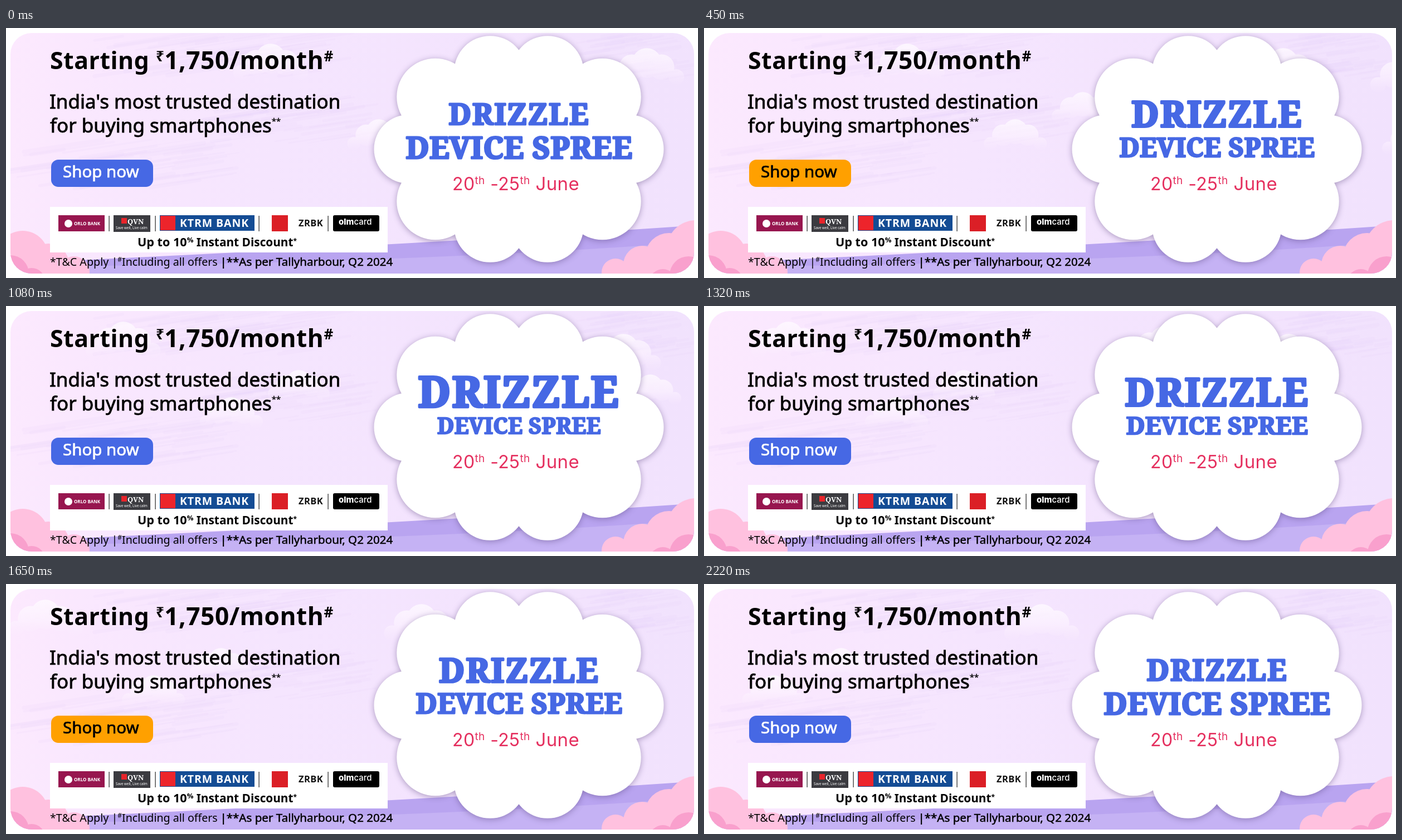
These frames come from a looping animation (1242 px wide and 450 px high, 2250 ms). An HTML page with a canvas:

```html
<!DOCTYPE html>
<html lang="en">
<head>
<meta charset="utf-8">
<title>Banner</title>
<style>
html, body { margin: 0; width: 100%; height: 100%; overflow: hidden; background: #fff; }
canvas { display: block; }
</style>
</head>
<body>
<canvas id="stage" width="1242" height="450"></canvas>
<script>
const W = 1242, H = 450, LOOP = 2250, STEP = 30;
const SANS = '"Noto Sans", "Open Sans", sans-serif';
const SERIF = '"Noto Serif", serif';
const INTER = 'Inter, sans-serif';
const BLUE = '#4668e4', ORANGE = '#ffa000', RED = '#e5305f';
const ctx = document.getElementById('stage').getContext('2d');

function layer(paint) {
  const c = document.createElement('canvas');
  c.width = W;
  c.height = H;
  paint(c.getContext('2d'));
  return c;
}

// Union of n circles, each given by a rule of its index
function blobs(n, rule) {
  const p = new Path2D();
  for (let i = 0; i < n; i++) {
    const [x, y, r] = rule(i);
    p.moveTo(x + r, y);
    p.arc(x, y, r, 0, 7);
  }
  return p;
}

function box(g, x, y, w, h, color, r = 0) {
  g.fillStyle = color;
  g.beginPath();
  g.roundRect(x, y, w, h, r);
  g.fill();
}

// Draws a run and returns its width; medium weight is regular plus a hairline
function text(g, str, x, y, size, weight = 400, color = '#000', font = SANS, gap = 0) {
  g.font = `${weight} ${size}px ${font}`;
  g.letterSpacing = gap + 'px';
  g.fillStyle = g.strokeStyle = color;
  g.fillText(str, x, y);
  if (weight === 500 && font === SANS) {
    g.lineWidth = size * 0.024;
    g.strokeText(str, x, y);
  }
  return g.measureText(str).width;
}

// Runs of [string, size, weight, rise] set one after another
function line(g, x, y, runs, color, font, gap) {
  for (const [str, size, weight, rise = 0] of runs)
    x += text(g, str, x, y - rise, size, weight, color, font, gap);
}

function clipCard(g) {
  g.beginPath();
  g.roundRect(8, 9, 1227, 433, 38);
  g.clip();
}

let seed = 11;
const rnd = () => (seed = seed * 16807 % 2147483647) / 2147483647;

// A loose patch of short dry brush strokes
function brush(g, x, y, w, h, color) {
  g.strokeStyle = color;
  g.lineCap = 'round';
  for (let i = 0; i < 45; i++) {
    const len = w * (0.1 + rnd() * 0.3);
    const sx = x + rnd() * (w - len), sy = y + rnd() * h;
    g.lineWidth = 1 + rnd() * 7;
    g.beginPath();
    g.moveTo(sx, sy);
    g.lineTo(sx + len, sy - len * 0.15);
    g.stroke();
  }
}

const sky = layer(g => {
  clipCard(g);
  const base = g.createLinearGradient(0, 0, W, 160);
  base.addColorStop(0, '#fce9fe');
  base.addColorStop(0.4, '#f5e5fe');
  base.addColorStop(1, '#f1e2fd');
  g.fillStyle = base;
  g.fillRect(0, 0, W, H);
  const shade = 'rgba(226,206,247,.14)';
  brush(g, 150, 20, 500, 70, shade);
  brush(g, 0, 220, 420, 70, shade);
  brush(g, 340, 130, 330, 80, shade);
  brush(g, 1020, 15, 230, 80, shade);
});

// Row of puffs stepping down sideways from a corner
function bank(g, x, y, r, dx, n, color) {
  g.fillStyle = color;
  g.fill(blobs(n, i => [x + i * dx, y + i * 14, r - i * 9]));
}

function hill(g, x, y, midY, endY, color) {
  g.fillStyle = color;
  g.beginPath();
  g.moveTo(x, H);
  g.lineTo(x, y);
  g.quadraticCurveTo(700, midY, W, endY);
  g.lineTo(W, H);
  g.fill();
}

// Ten lobes on an ellipse, pulled a little towards its diagonals
function lobe(i) {
  const a = i * Math.PI / 5, s = Math.sin(2 * a), b = a + 0.087 * s;
  return [920.5 + 198 * Math.cos(b), 218 + 144 * Math.sin(b), 62 + 8 * s * s];
}

function scenery(g) {
  g.save();
  clipCard(g);
  hill(g, 0, 424, 392, 355, '#b9a4f0');
  hill(g, 0, 430, 425, 385, '#c5b2f4');
  bank(g, 30, 411, 46, 46, 3, '#ffc1df');
  bank(g, 1238, 398, 52, -48, 4, '#ffc1df');
  bank(g, 8, 442, 33, 38, 2, '#f9a0cd');
  bank(g, 1225, 445, 34, -46, 2, '#f9a0cd');
  g.restore();

  g.save();
  g.shadowColor = 'rgba(85,65,120,.45)';
  g.shadowBlur = 11;
  g.shadowOffsetY = 2;
  g.fillStyle = '#fff';
  const cloud = blobs(10, lobe);
  cloud.addPath(blobs(1, () => [920, 218, 160]));
  g.fill(cloud);
  g.restore();
}

function copy(g) {
  line(g, 79, 74, [['Starting ', 42.8, 700], ['₹', 26, 700, 14], ['1,750/month', 44.3, 700], ['#', 26, 600, 14]],
    '#000', SANS, 0.5);
  line(g, 78, 145, [["India's most trusted destination", 35, 500]]);
  line(g, 79, 188, [['for buying smartphones', 35, 500], ['**', 15, 500, 15]]);
  line(g, 801, 292, [['20', 32, 400], ['th', 19, 400, 11], [' -25', 32, 400], ['th', 19, 400, 11], [' June', 33, 400]],
    RED, INTER, 0.4);
  line(g, 79, 428, [['*T&C Apply |', 19.7, 400], ['#', 12, 400, 7], ['Including all offers', 19.6, 400],
    [' |', 19.6, 600], ['**As per Tallyharbour, Q2 2024', 20.6, 500]]);
}

function offers(g) {
  box(g, 79, 322, 606, 82, '#fff');
  for (const x of [185, 268, 454, 578]) box(g, x - 0.5, 338, 1.2, 28, '#222');

  box(g, 94, 337, 83, 29, '#97164f');
  g.fillStyle = '#fff';
  g.fill(blobs(1, () => [112, 352, 7]));
  text(g, 'ORLO BANK', 122, 355, 8, 600, '#fff');

  box(g, 193, 337, 66, 30, '#3b3b40');
  box(g, 207, 342, 10, 10, '#e8252b');
  text(g, 'QVN', 218, 353, 13, 700, '#fff', SERIF);
  text(g, 'Save well, Live calm', 197, 362, 6.2, 400, '#fff');

  box(g, 276, 337, 170, 28, '#144c94');
  box(g, 277, 338, 27, 26, '#ed242b');
  text(g, 'KTRM BANK', 312, 358, 19.5, 700, '#fff', SANS, 0.9);

  box(g, 477, 337, 29, 29, '#db1f26');
  text(g, 'ZRBK', 525, 357, 16.5, 600, '#111', SANS, 0.4);

  box(g, 587, 337, 83, 29, '#000', 3);
  line(g, 597, 354, [['olm', 15, 800], ['card', 15, 500]], '#fff', INTER);

  line(g, 236, 393, [['Up to 10', 21.6, 600], ['%', 13, 600, 7], [' Instant Discount', 20.8, 600], ['*', 12, 600, 5]]);
}

const front = layer(g => {
  scenery(g);
  copy(g);
  offers(g);
});

// Each lane of drifting clouds: first left, top, width, count, spacing, drop
const LANES = [
  [405, 28, 140, 1, 0, 0],
  [1080, 36, 140, 2, 223, 14],
  [732, 115, 116, 2, 631, 8],
  [610, 164, 118, 2, 715, 8]
];
const SPEED = 0.245;

function puff(x, y, w) {
  const h = w * 0.48;
  const fade = ctx.createLinearGradient(0, y, 0, y + h);
  fade.addColorStop(0, 'rgba(255,252,255,.75)');
  fade.addColorStop(0.55, 'rgba(253,244,255,.6)');
  fade.addColorStop(1, 'rgba(250,236,255,0)');
  ctx.fillStyle = fade;
  ctx.fill(blobs(5, i => {
    const u = i / 4, rise = Math.sin(Math.PI * u);
    return [x + w * (0.12 + 0.76 * u), y + h * (0.78 - 0.38 * rise), w * (0.1 + 0.09 * rise)];
  }));
}

function drift(t) {
  ctx.save();
  clipCard(ctx);
  for (const [x, y, w, n, gap, drop] of LANES)
    for (let i = 0; i < n; i++) puff(x + i * gap - SPEED * t, y + i * drop, w);
  ctx.restore();
}

function title(str, y, size, scale, gap) {
  ctx.save();
  ctx.translate(921, y);
  ctx.scale(scale, scale);
  ctx.textAlign = 'center';
  ctx.lineJoin = 'round';
  text(ctx, str, 0, size * 0.357, size, 700, BLUE, SERIF, gap);
  ctx.lineWidth = 3.2;
  ctx.strokeText(str, 0, size * 0.357);
  ctx.restore();
}

// Linear rise to the peak, linear fall, then rest
function swell(t) {
  const peak = 998, end = 1917;
  return t < peak ? t / peak : Math.max(0, (end - t) / (end - peak));
}

function draw(t) {
  ctx.clearRect(0, 0, W, H);
  ctx.drawImage(sky, 0, 0);
  drift(t);
  ctx.drawImage(front, 0, 0);

  const k = swell(t);
  title('DRIZZLE', 155, 53, 1 + 0.474 * k, 2);
  title('DEVICE SPREE', 215.5, 55, 1 - 0.305 * k, 0.4);

  const lit = Math.floor(t / 450) % 2 === 1;
  box(ctx, 81, 237, 183, 49, lit ? ORANGE : BLUE, 13);
  text(ctx, 'Shop now', 102, 269, 29.5, 500, lit ? '#000' : '#fff');
}

const start = performance.now();
function tick() {
  const t = (performance.now() - start) % LOOP;
  draw(Math.floor(t / STEP) * STEP);
  requestAnimationFrame(tick);
}
tick();
</script>
</body>
</html>
```
